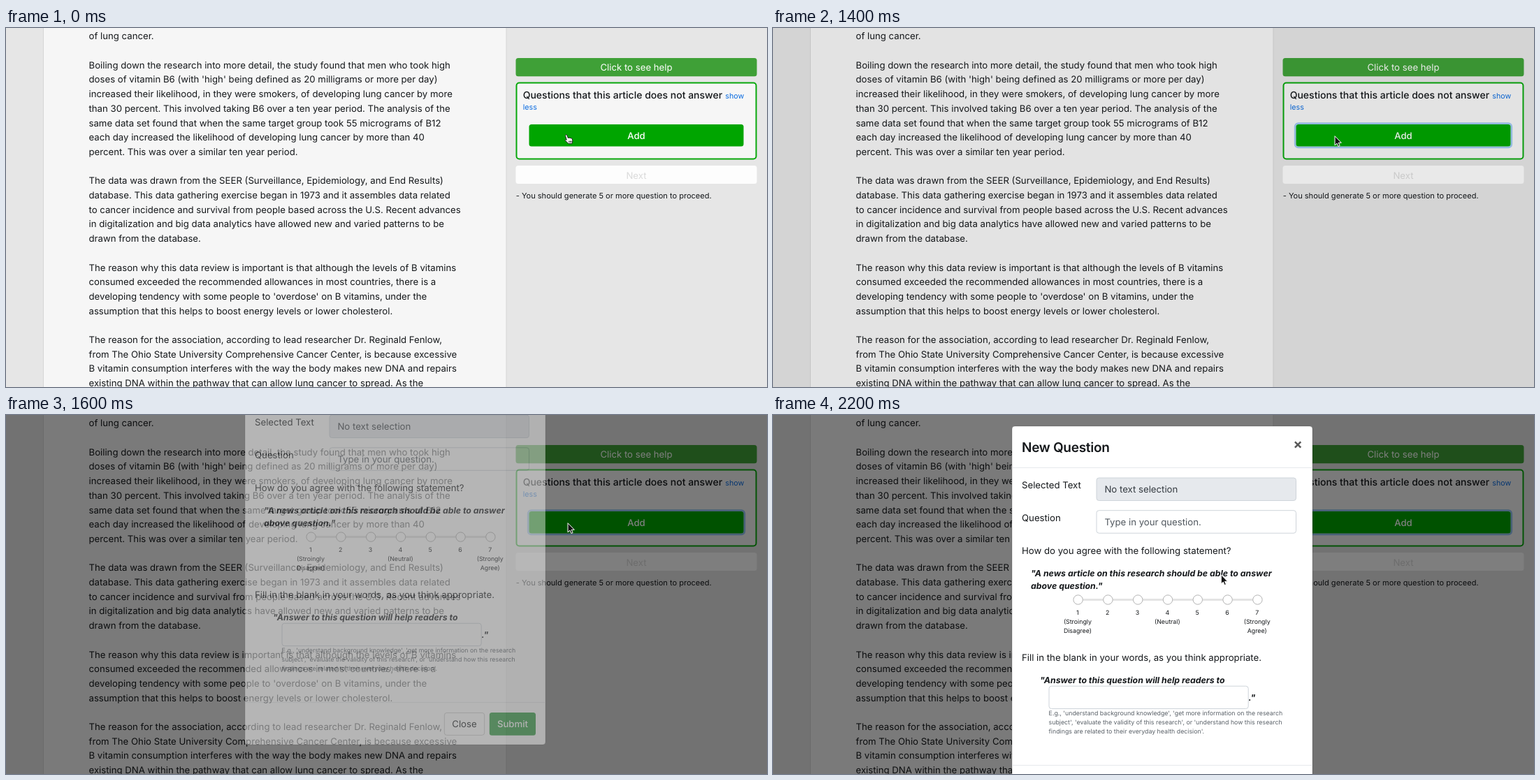
Recreate the animation shown at these times as an HTML page. Size 1089x514 px, loop 2270 ms.

```html
<!DOCTYPE html>
<html lang="en">
<head>
<meta charset="utf-8">
<title>Add a question</title>
<style>
  html, body { margin: 0; width: 100%; height: 100%; overflow: hidden; background: #e6e6e6; }
  svg { display: block; width: 100vw; height: 100vh; }
  text { font: 13.2px Inter, "Liberation Sans", sans-serif; fill: #15181b; text-rendering: geometricPrecision; white-space: pre; }
  .mid { text-anchor: middle; }
  .white { fill: #fff; }
  .strong { font-weight: 500; }
  .heading { font-size: 14px; font-weight: 500; }
  .link { font-size: 10.7px; fill: #0a6be0; }
  .note { font-size: 11.05px; }
  .off { fill: #dadada; }
  .title { font-size: 19px; font-weight: 600; letter-spacing: -.015em; }
  .field { fill: #343a40; }
  .hint { fill: #50575e; }
  .quote { font-size: 12.3px; font-weight: 700; font-style: italic; }
  .tiny { font-size: 8.8px; }
  .help { font-size: 8.8px; fill: #5a6168; }
</style>
</head>
<body>
<svg id="stage" viewBox="0 0 1089 514" preserveAspectRatio="none"></svg>
<script>
const LOOP = 2270;
const STEP = 200 / 3; // the screen refreshes 15 times a second

const article = `of lung cancer.

Boiling down the research into more detail, the study found that men who took high
doses of vitamin B6 (with 'high' being defined as 20 milligrams or more per day)
increased their likelihood, in they were smokers, of developing lung cancer by more
than 30 percent. This involved taking B6 over a ten year period. The analysis of the
same data set found that when the same target group took 55 micrograms of B12
each day increased the likelihood of developing lung cancer by more than 40
percent. This was over a similar ten year period.

The data was drawn from the SEER (Surveillance, Epidemiology, and End Results)
database. This data gathering exercise began in 1973 and it assembles data related
to cancer incidence and survival from people based across the U.S. Recent advances
in digitalization and big data analytics have allowed new and varied patterns to be
drawn from the database.

The reason why this data review is important is that although the levels of B vitamins
consumed exceeded the recommended allowances in most countries, there is a
developing tendency with some people to 'overdose' on B vitamins, under the
assumption that this helps to boost energy levels or lower cholesterol.

The reason for the association, according to lead researcher Dr. Reginald Fenlow,
from The Ohio State University Comprehensive Cancer Center, is because excessive
B vitamin consumption interferes with the way the body makes new DNA and repairs
existing DNA within the pathway that can allow lung cancer to spread. As the`;

const text = (x, y, string, kind = '') => `<text x="${x}" y="${y}" class="${kind}">${string}</text>`;
const lines = (x, y, pitch, block, kind) =>
  block.split('\n').map((line, i) => text(x, y + i * pitch, line, kind)).join('');
const box = (x, y, w, h, fill, stroke = 'none', r = 3.5, width = 1) =>
  `<rect x="${x}" y="${y}" width="${w}" height="${h}" rx="${r}" fill="${fill}" stroke="${stroke}" stroke-width="${width}"/>`;

const page = `
  <rect width="1089" height="514" fill="#e6e6e6"/>
  <rect x="53.5" y="-2" width="662.5" height="518" fill="#f6f6f6" stroke="#d6d6d6"/>
  ${lines(118.5, 16.3, 20.7, article)}
  ${box(729.5, 43, 345, 26.2, '#3fa037')}
  ${text(902, 61.3, 'Click to see help', 'mid white')}
  ${box(730.5, 78.5, 343, 109, '#f6f6f6', '#08a80c', 4, 2)}
  ${text(739.7, 101.2, 'Questions that this article does not answer', 'heading')}
  ${text(1029.3, 101.2, 'show', 'link')}
  ${text(739.7, 117.3, 'less', 'link')}
  <g id="focus">${box(747.2, 136.7, 309.6, 34.1, 'none', '#5fa8f0', 4.5, 2.8)}</g>
  ${box(748.5, 138, 307, 31.5, '#00a500')}
  ${text(902, 158.8, 'Add', 'mid white strong')}
  ${box(729.5, 197, 345, 26, '#fdfdfd')}
  ${text(902, 215.8, 'Next', 'mid off')}
  ${text(729.7, 243.6, '- You should generate 5 or more question to proceed.', 'note')}`;

const captions = { 1: '(Stroingly\nDisagree)', 4: '(Neutral)', 7: '(Strongly\nAgree)' };
const scale = [1, 2, 3, 4, 5, 6, 7].map(n => {
  const x = 436.6 + (n - 1) * 42.8;
  return `<circle cx="${x}" cy="264.5" r="6.7" fill="#fff" stroke="#b4b4b4"/>` +
    lines(x - .7, 285.6, 13, n + '\n' + (captions[n] || ''), 'tiny mid');
}).join('');

const dialog = `
  ${box(342, 16, 430, 546, '#fff', 'rgba(0,0,0,.2)', 4)}
  ${text(356, 52.9, 'New Question', 'title')}
  <path d="M746.9 38.3l8.4 8.4m0-8.4l-8.4 8.4" stroke="#585858" stroke-width="2.5"/>
  <path d="M342 75.5h430M342 501.5h430" stroke="#e6e9ec"/>
  ${text(356, 105.4, 'Selected Text')}
  ${box(463, 90, 285.5, 32.5, '#e6e9ed', '#ced4da')}
  ${text(474.4, 111.4, 'No text selection', 'field')}
  ${text(356, 152, 'Question')}
  ${box(463, 136.7, 285.5, 32.5, '#fff', '#ced4da')}
  ${text(474.4, 158, 'Type in your question.', 'hint')}
  ${text(356, 198.8, 'How do you agree with the following statement?')}
  ${lines(369, 230.8, 18, '"A news article on this research should be able to answer\nabove question."', 'quote')}
  <path d="M437 264.5h256" stroke="#e4e4e4" stroke-width="3"/>
  ${scale}
  ${text(356, 351.8, 'Fill in the blank in your words, as you think appropriate.')}
  ${text(382, 383.6, '"Answer to this question will help readers to', 'quote')}
  ${box(395, 388.2, 285.2, 32.3, '#fff', '#ced4da')}
  ${text(680.6, 409, '."', 'quote')}
  ${lines(394.6, 430.4, 13, `E.g., 'understand background knowledge', 'get more information on the research
subject', 'evaluate the validity of this research', or 'understand how this research
findings are related to their everyday health decision'.`, 'help')}
  ${box(627.3, 516.3, 57.4, 32, '#fff', '#ccc')}
  ${text(656, 537.2, 'Close', 'mid')}
  ${box(691.8, 516, 66.2, 32.7, '#2e9b40')}
  ${text(725, 537.2, 'Submit', 'mid white strong')}`;

const hand = `<path d="M2.7 8.8L1 3.1Q.6 1.4 1.9 1.2 3 1 3.5 2.5L4.7 6Q5.5 5.1 6.6 5.8 7.7 5.2 8.5 6.2
  10.2 5.8 10.7 7.4L11.2 10Q11.2 12 10.2 14H5.2Q3.4 11.6 1 10 0 8.8 1.2 8.3 2 8.1 2.7 8.8Z
  M6.2 10v2.4m1.7-2.4v2.4m1.7-2.4v2.4" fill="#fff" stroke="#111" stroke-width=".9" stroke-linejoin="round"/>`;
const arrow = `<path d="M0 0V13.2L3 10.4 4.9 14.8 7.1 13.9 5.2 9.6H9.3Z" fill="#111" stroke="#fff"/>`;

document.getElementById('stage').innerHTML = `${page}
  <rect id="backdrop" width="1089" height="514"/>
  <g id="dialog">${dialog}</g>
  <g id="hand">${hand}</g>
  <g id="arrow">${arrow}</g>`;

const [focusRing, backdrop, modal, handCursor, arrowCursor] =
  ['focus', 'backdrop', 'dialog', 'hand', 'arrow'].map(id => document.getElementById(id));

const progress = (t, start, length) => Math.min(1, Math.max(0, (t - start) / length));
const smooth = p => p * p * (3 - 2 * p);
const move = (node, x, y) => node.setAttribute('transform', `translate(${x} ${y})`);
const fade = (node, opacity) => node.setAttribute('opacity', opacity);

// CSS "ease-out": cubic-bezier(0, 0, .58, 1)
function easeOut(p) {
  let low = 0, high = 1;
  for (let i = 0; i < 20; i++) {
    const s = (low + high) / 2;
    if (1.74 * s * s - .74 * s ** 3 < p) low = s; else high = s;
  }
  return smooth(low);
}

function draw(time) {
  const t = Math.floor((Math.floor(time / 10) * 10 + 4) / STEP) * STEP;
  fade(focusRing, .65 * progress(t, 1270, 150));
  fade(backdrop, .5 * progress(t, 1377, 150));
  fade(modal, progress(t, 1533, 150));
  move(modal, 0, -136.5 * (1 - easeOut(progress(t, 1533, 300))));

  const drift = progress(t, 400, 200);
  move(handCursor, 799.6 + drift, 151.6 + 5 * drift);
  const travel = smooth(progress(t, 1734, 466));
  move(arrowCursor, 804 - 162.7 * travel, 154.7 + 74 * travel);

  const covered = t >= 1390;
  fade(handCursor, covered ? 0 : 1);
  fade(arrowCursor, covered ? 1 : 0);
}

const start = performance.now();
function tick() {
  draw((performance.now() - start) % LOOP);
  requestAnimationFrame(tick);
}
tick();
</script>
</body>
</html>
```
